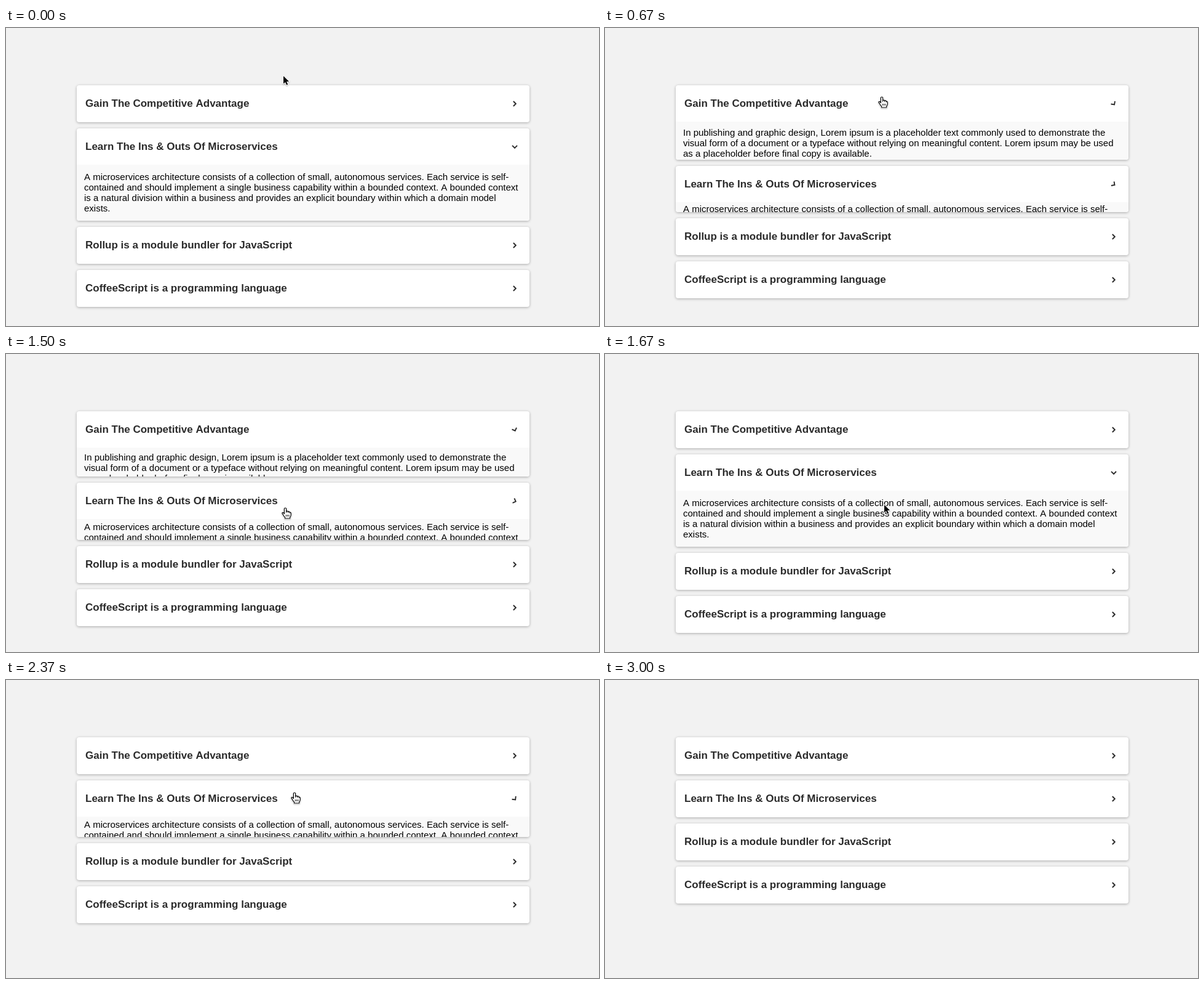
Recreate the animation shown at these times as an HTML page with a canvas. Size 964 px wide and 484 px high, loop 3.21 s.

```html
<!DOCTYPE html>
<html lang="en">
<head>
<meta charset="utf-8">
<title>Accordion</title>
<style>
  html, body { margin: 0; width: 100%; height: 100%; overflow: hidden; background: #f2f2f2; }
  canvas { display: block; }
</style>
</head>
<body>
<canvas id="stage" width="964" height="484"></canvas>
<script>
const ctx = document.getElementById('stage').getContext('2d');
const LOOP = 3210;
const LEFT = 115, WIDTH = 736, TOP = 93, GAP = 10, HEADER = 60;
const LINE = 17, PADDING = 11;
const SLIDE = 200, TURN = 260;
const CLICKS = [524, 1418, 2252];
const CURSOR_GONE = 2530;

const ITEMS = [
  { title: 'Gain The Competitive Advantage', lines: [
    'In publishing and graphic design, Lorem ipsum is a placeholder text commonly used to demonstrate the',
    'visual form of a document or a typeface without relying on meaningful content. Lorem ipsum may be used',
    'as a placeholder before final copy is available.'] },
  { title: 'Learn The Ins & Outs Of Microservices', lines: [
    'A microservices architecture consists of a collection of small, autonomous services. Each service is self-',
    'contained and should implement a single business capability within a bounded context. A bounded context',
    'is a natural division within a business and provides an explicit boundary within which a domain model',
    'exists.'] },
  { title: 'Rollup is a module bundler for JavaScript', lines: [] },
  { title: 'CoffeeScript is a programming language', lines: [] }
];

// Pointer tip: time, x, y
const POINTER = [
  [30, 451, 78], [500, 450, 112], [680, 450, 112], [980, 457, 214],
  [1120, 457, 214], [1230, 454, 250], [1520, 454, 250], [1670, 454, 245],
  [1860, 469, 183], [2390, 469, 183], [2515, 476, 87]
];

const swing = x => 0.5 - Math.cos(Math.PI * Math.min(1, Math.max(0, x))) / 2;

// How far each item is open, from 0 to 1
function openness(t, duration) {
  const [a, b, c] = CLICKS.map(start => swing((t - start) / duration));
  return [a - b, 1 - a + b - c, 0, 0];
}

function pointerAt(t) {
  const next = POINTER.findIndex(key => key[0] > t);
  if (next === 0) return POINTER[0].slice(1);
  if (next < 0) return POINTER[POINTER.length - 1].slice(1);
  const [t0, x0, y0] = POINTER[next - 1], [t1, x1, y1] = POINTER[next];
  const k = swing((t - t0) / (t1 - t0));
  return [Math.round(x0 + (x1 - x0) * k), Math.round(y0 + (y1 - y0) * k)];
}

function layout(t) {
  const slide = openness(t, SLIDE), turn = openness(t, TURN);
  let y = TOP;
  return ITEMS.map((item, i) => {
    const full = item.lines.length * LINE + 2 * PADDING;
    const top = Math.round(y);
    y += HEADER + full * slide[i];
    const card = { ...item, top, height: Math.round(y) - top, slide: slide[i], turn: turn[i] };
    y += GAP;
    return card;
  });
}

function drawChevron(y, turn) {
  ctx.save();
  ctx.translate(827, y);
  ctx.rotate(turn * Math.PI / 2);
  ctx.beginPath();
  ctx.moveTo(-2.2, -4);
  ctx.lineTo(1.8, 0);
  ctx.lineTo(-2.2, 4);
  ctx.strokeStyle = '#2b2b2b';
  ctx.lineWidth = 1.9;
  ctx.stroke();
  ctx.restore();
}

function drawCard({ title, lines, top, height, slide, turn }) {
  const box = new Path2D();
  box.roundRect(LEFT, top, WIDTH, height, 4);
  ctx.save();
  ctx.shadowColor = 'rgba(0,0,0,0.3)';
  ctx.shadowBlur = 4;
  ctx.shadowOffsetY = 1;
  ctx.fillStyle = '#fff';
  ctx.fill(box);
  ctx.restore();

  if (slide > 0.001) {
    ctx.save();
    ctx.clip(box);
    ctx.fillStyle = '#f9f9f9';
    ctx.fillRect(LEFT, top + HEADER - 1, WIDTH, height);
    ctx.fillStyle = '#000';
    ctx.font = '15px "Liberation Sans", Arial, sans-serif';
    const baseline = top + 73 + Math.round(PADDING * slide);
    lines.forEach((line, i) => ctx.fillText(line, 127, baseline + i * LINE));
    ctx.restore();
  }

  ctx.fillStyle = '#2b2b2b';
  ctx.font = 'bold 17px "Liberation Sans", Arial, sans-serif';
  ctx.fillText(title, 129, top + 35);
  drawChevron(top + 30, turn);
}

const ARROW = new Path2D('M0 0V12.6L3 9.9L5.1 14.6L7.2 13.7L5.1 9H9.1Z');
const HAND = new Path2D(
  'M-1.6 9.5V1.4Q-1.6 0 0 0T1.6 1.4V6Q1.9 5 3.2 5.1Q4.5 5.3 4.5 6.3Q5 5.5 6.1 5.8' +
  'Q7.2 6.1 7.2 7.2Q9.3 6.8 9.3 8.8V11.5Q9 13.6 7.7 15.1V17H-0.5V15.2Q-2.5 13.2 -3.4 11.2' +
  'Q-4.5 9.8 -5 8.9Q-5.3 7.5 -4 7.3Q-2.7 7.6 -1.6 9.5Z');
const KNUCKLES = new Path2D('M1.6 5.5V8M4.5 6V8.2M7.2 7V8.8M1.3 11V14M3.6 11V14M5.9 11V14');

function drawPointer(x, y, hand) {
  ctx.save();
  ctx.translate(x, y);
  ctx.lineJoin = 'round';
  ctx.shadowColor = 'rgba(0,0,0,0.3)';
  ctx.shadowBlur = 2;
  ctx.shadowOffsetY = 1;
  ctx.strokeStyle = '#fff';
  ctx.lineWidth = hand ? 2.4 : 2;
  ctx.stroke(hand ? HAND : ARROW);
  ctx.shadowColor = 'transparent';
  ctx.fillStyle = hand ? '#fff' : '#000';
  ctx.fill(hand ? HAND : ARROW);
  if (hand) {
    ctx.strokeStyle = '#000';
    ctx.lineWidth = 1.2;
    ctx.stroke(HAND);
    ctx.lineWidth = 0.9;
    ctx.stroke(KNUCKLES);
  }
  ctx.restore();
}

function draw(t) {
  ctx.fillStyle = '#f2f2f2';
  ctx.fillRect(0, 0, 964, 484);
  const cards = layout(t);
  cards.forEach(drawCard);
  if (t < CURSOR_GONE) {
    const [x, y] = pointerAt(t);
    drawPointer(x, y, cards.some(c => y >= c.top && y < c.top + HEADER));
  }
}

const start = performance.now();
function tick() {
  draw((performance.now() - start) % LOOP);
  requestAnimationFrame(tick);
}
tick();
</script>
</body>
</html>
```
